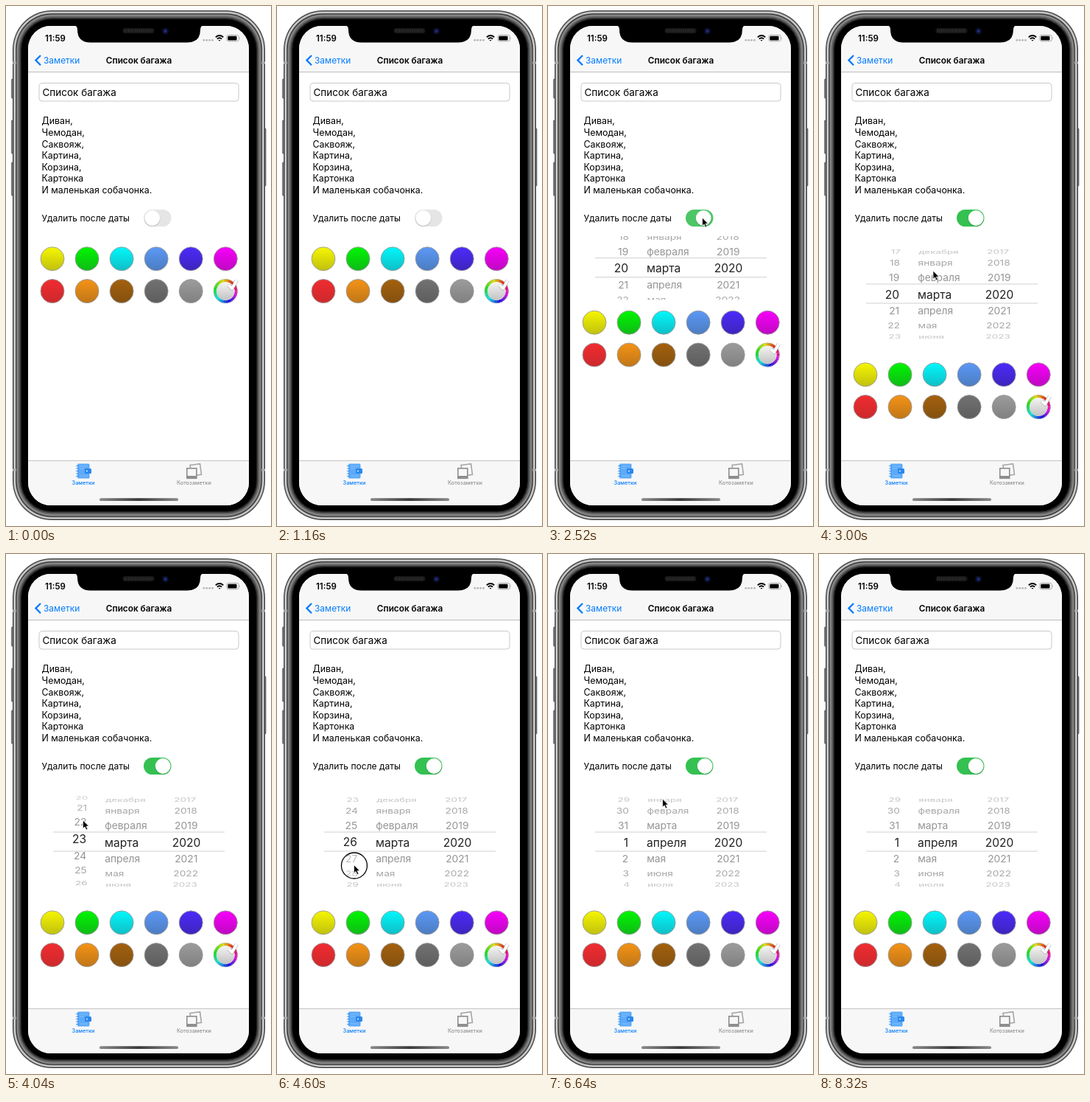
These frames come from a looping animation (360 px wide and 705 px high, 9280 ms). An HTML page:

```html
<!DOCTYPE html>
<html lang="ru">
<head>
<meta charset="utf-8">
<title>Заметки</title>
<style>
html, body { margin: 0; width: 100%; height: 100%; overflow: hidden; background: #fff; }
svg { display: block; width: 360px; height: 705px; font-family: Inter, "Liberation Sans", sans-serif; }
text { white-space: pre; }
</style>
</head>
<body>
<svg id="stage" viewBox="0 0 360 705" xmlns="http://www.w3.org/2000/svg">
  <defs>
    <linearGradient id="disc" x1="0" x2="0" y1="0" y2="1">
      <stop offset="0" stop-color="#f4f4f4"/><stop offset="1" stop-color="#c2c2c2"/>
    </linearGradient>
    <linearGradient id="home">
      <stop offset="0" stop-color="#8a8a8a"/><stop offset=".5" stop-color="#3a3a3a"/>
      <stop offset="1" stop-color="#8a8a8a"/>
    </linearGradient>
    <clipPath id="screen"><rect x="30" y="27" width="300" height="650" rx="31"/></clipPath>
    <clipPath id="wheelClip"><rect id="wheelBox" x="60" width="240"/></clipPath>
  </defs>

  <!-- phone body -->
  <g fill="#8b8b8b" stroke="#444" stroke-width=".7">
    <rect x="7.4" y="99" width="4" height="26" rx="1"/>
    <rect x="7.4" y="155" width="4" height="45" rx="1"/>
    <rect x="7.4" y="212" width="4" height="45" rx="1"/>
    <rect x="349" y="166" width="4" height="78" rx="1"/>
  </g>
  <g id="body"></g>
  <path d="M9 77h5M9 629h5M347 77h5M347 629h5" stroke="#aaa" stroke-width="3"/>

  <g clip-path="url(#screen)">
    <rect x="30" y="27" width="300" height="650" fill="#fff"/>
    <path d="M30 27h300v62.5h-300z" fill="#f7f7f7"/>
    <path d="M30 89.5h300" stroke="#bcbcbc"/>

    <!-- status bar -->
    <text x="53" y="48" font-size="11.5" font-weight="600">11:59</text>
    <g fill="#b5b5b5">
      <circle cx="268.8" cy="46.3" r="1.4"/><circle cx="272.7" cy="46.3" r="1.4"/>
      <circle cx="276.6" cy="46.3" r="1.4"/><circle cx="280.5" cy="46.3" r="1.4"/>
    </g>
    <g fill="none" stroke="#000" stroke-width="1.8">
      <path d="M284.8 42.2q5.2-4.4 10.4 0M286.8 44.6q3.2-2.6 6.4 0"/>
      <path d="M288.5 46l1.5 1.8 1.5-1.8z" fill="#000" stroke="none"/>
    </g>
    <rect x="299.9" y="39.4" width="16.4" height="8.4" rx="2.4" fill="none" stroke="#999" stroke-width=".8"/>
    <rect x="301.3" y="40.8" width="12.2" height="5.6" rx="1.2"/>
    <path d="M317.3 42.2q1.4 1.4 0 2.8z" fill="#999"/>

    <!-- navigation bar -->
    <path d="M47 67l-6.6 6.6 6.6 6.6" fill="none" stroke="#007aff" stroke-width="2.3"/>
    <text x="51" y="78" font-size="11.9" fill="#007aff">Заметки</text>
    <text x="180.5" y="78" font-size="11.8" font-weight="600" text-anchor="middle">Список багажа</text>

    <!-- note -->
    <rect x="45" y="104.5" width="271" height="24.5" rx="4" fill="#fff" stroke="#c9c9c9"/>
    <text x="49.5" y="121.5" font-size="13.5">Список багажа</text>
    <g id="note" font-size="12.4"></g>
    <text x="48.5" y="291.7" font-size="12.1">Удалить после даты</text>
    <rect id="track" x="187" y="276" width="37.5" height="23" rx="11.5"/>
    <circle id="knobShade" cy="288.4" r="10.8" fill="#000" fill-opacity=".12"/>
    <circle id="knob" cy="287.5" r="10.4" fill="#fff"/>

    <!-- date picker -->
    <g id="wheel" clip-path="url(#wheelClip)">
      <path id="lines" d="M64 -13.5H297M64 12.5H297" stroke="#cfcfcf"/>
    </g>

    <g id="palette"></g>

    <!-- tab bar -->
    <path d="M30 616.5h300v61h-300z" fill="#f7f7f7"/>
    <path d="M30 616.5h300" stroke="#c4c4c4"/>
    <rect x="97" y="620.5" width="16.5" height="20" rx="1.5" fill="#5caafa"/>
    <path d="M100 624h11M100 627h6M100 637h11" stroke="#86c0fb"/>
    <path d="M95 623.5h4M95 627h4M95 630.5h4M95 634h4M95 637.5h4" stroke="#3b93f0" stroke-width="1.2"/>
    <rect x="107" y="627" width="9" height="7" rx="1.5" fill="#2b88ec"/>
    <circle cx="110" cy="630.5" r="1.1" fill="#cfe6ff"/>
    <g fill="#f7f7f7" stroke="#8e8e8e">
      <path d="M250 622.5l13.5-1.8 2 14.5-13.5 1.8z" stroke="#a5a5a5" stroke-width="1.6"/>
      <rect x="245.8" y="626.8" width="13" height="13.5" stroke-width="1.6"/>
      <path d="M246 638.6h12.6" stroke-width="3"/>
    </g>
    <g font-size="7.3" font-weight="500" text-anchor="middle">
      <text x="105" y="649" fill="#007aff">Заметки</text>
      <text x="255.5" y="649" fill="#929292">Котозаметки</text>
    </g>
    <rect x="127" y="667.3" width="107" height="3.8" rx="1.9" fill="url(#home)"/>
  </g>

  <!-- notch -->
  <path d="M91 26q6 0 6 6q0 17.5 18 17.5h131q18 0 18-17.5q0-6 6-6z"/>
  <rect x="158.5" y="30" width="43" height="7" rx="3.5" fill="#181818"/>
  <path d="M161 33.5h38" stroke="#333" stroke-width="4" stroke-dasharray="1 1.5"/>
  <circle cx="216.5" cy="34" r="4.6" fill="#0b0e24"/>
  <circle cx="216.5" cy="34" r="2.2" fill="#1d2a78"/>

  <g id="cursor">
    <circle id="press" r="17.5" fill="#fff" fill-opacity=".35" stroke="#000" stroke-width="1.3"/>
    <path d="M-.5 -1v11.2l2.6-2.3 1.9 4.2 2-.9-1.9-4.1h3.5z" stroke="#fff" stroke-width=".8"/>
  </g>
</svg>
<script>
const LOOP = 9280, STEP = 19.3 * Math.PI / 180, RADIUS = 68, OPEN = 157, TOP = 312;
const MONTHS = ['января', 'февраля', 'марта', 'апреля', 'мая', 'июня', 'июля',
  'августа', 'сентября', 'октября', 'ноября', 'декабря'];
const $ = id => document.getElementById(id);
const clamp = v => Math.min(1, Math.max(0, v));
const smooth = v => v * v * (3 - 2 * v);
const linear = v => v;
const out = v => 1 - (1 - v) ** 3;
const wrap = (n, size) => ((n % size) + size) % size;

function add(parent, tag, attrs, content) {
  const el = document.createElementNS('http://www.w3.org/2000/svg', tag);
  for (const key in attrs) el.setAttribute(key, attrs[key]);
  if (content) el.textContent = content;
  return parent.appendChild(el);
}

// Keys are [time, values, ease into this key].
function at(keys, t) {
  const i = keys.findIndex(key => key[0] > t);
  if (i < 0) return keys[keys.length - 1][1];
  if (i === 0) return keys[0][1];
  const [t0, a] = keys[i - 1], [t1, b, ease = smooth] = keys[i];
  const p = ease((t - t0) / (t1 - t0));
  return a.map((v, n) => v + (b[n] - v) * p);
}

// Steel rim: nested rounded shells from the edge inwards
const shells = [[0, '#3a3a3a'], [1, '#8c8c8c'], [2, '#d9d9d9'], [3.6, '#7d7d7d'], [4.6, '#2a2a2a'],
  [5.6, '#8e8e8e'], [7, '#787878'], [8.4, '#5c5c5c'], [9.8, '#3c3c3c'], [11, '#1c1c1c'], [12.2, '#000']];
for (const [inset, fill] of shells)
  add($('body'), 'rect', {
    x: 9 + inset, y: 6 + inset, width: 343 - 2 * inset, height: 691 - 2 * inset, rx: 53 - inset, fill
  });

const pointer = [
  [1400, [322, 430]], [2150, [210, 288]], [2720, [210, 288]],
  [3250, [110, 420]], [3450, [109, 420]], [4040, [105, 362]], [4120, [105, 358]],
  [4450, [105, 425]], [4550, [105, 425]], [5120, [103, 315]], [5350, [103, 315]],
  [5780, [158, 385]], [5900, [158, 385]], [6250, [156, 350]], [6600, [156, 333]],
  [6900, [156, 333]], [7400, [300, 470]]
];
const presses = [[2200, 2360], [3400, 3960], [4550, 5220], [5860, 6220]];
const dayKeys = [
  [3450, [20]], [3960, [22.7]], [4040, [23.2], linear], [4500, [26], out],
  [4580, [26]], [5160, [30.93]], [5450, [31], out], [6250, [31]], [6580, [32]]
];
const monthKeys = [[5900, [2]], [6200, [2.8]], [6450, [3], out]];

const columns = [
  { x: 109, anchor: 'end', keys: dayKeys, label: n => wrap(n - 1, 31) + 1 },
  { x: 134, anchor: 'start', keys: monthKeys, label: n => MONTHS[wrap(n, 12)] },
  { x: 245, anchor: 'middle', keys: [[0, [2020]]], label: n => n }
];
for (const col of columns) {
  col.rows = [];
  for (let k = -4; k <= 4; k++)
    col.rows.push({ k, el: add($('wheel'), 'text', { 'text-anchor': col.anchor }) });
}

['Диван,', 'Чемодан,', 'Саквояж,', 'Картина,', 'Корзина,', 'Картонка', 'И маленькая собачонка.']
  .forEach((line, i) => add($('note'), 'text', { x: 48.5, y: 160.3 + i * 15.6 }, line));

const swatches = [
  ['#f6f600', '#c0c010'], ['#00f600', '#10ba18'], ['#00f8fb', '#10bec6'],
  ['#5b98f6', '#4c7cc0'], ['#4b2bfa', '#3e24bc'], ['#f800fb', '#be08c0'],
  ['#f02c30', '#cc292c'], ['#f49316', '#c07618'], ['#a4600d', '#835110'],
  ['#727272', '#5d5d5d'], ['#9c9c9c', '#808080']
];
const spot = i => ({ cx: 63 + i % 6 * 47.05, cy: i < 6 ? 342.8 : 386.6 });
swatches.forEach(([top, bottom], i) => {
  const grad = add(document.querySelector('defs'), 'linearGradient',
    { id: 'paint' + i, x1: 0, x2: 0, y1: 0, y2: 1 });
  add(grad, 'stop', { offset: 0, 'stop-color': top });
  add(grad, 'stop', { offset: 1, 'stop-color': bottom });
  add($('palette'), 'circle',
    { ...spot(i), r: 16, fill: `url(#paint${i})`, stroke: '#999', 'stroke-width': .9 });
});

// Hue ring with a tick
const ring = spot(11);
for (let a = 0; a < 360; a += 10) {
  const point = deg => {
    const r = deg * Math.PI / 180;
    return `${ring.cx + 14.3 * Math.cos(r)} ${ring.cy - 14.3 * Math.sin(r)}`;
  };
  add($('palette'), 'path', {
    d: `M${point(a)}A14.3 14.3 0 0 0 ${point(a + 10.5)}`,
    fill: 'none', stroke: `hsl(${a - 40} 88% 46%)`, 'stroke-width': 4
  });
}
add($('palette'), 'circle', { ...ring, r: 16.2, fill: 'none', stroke: '#aaa', 'stroke-width': .6 });
add($('palette'), 'circle', { ...ring, r: 12.3, fill: 'url(#disc)' });
for (const [stroke, width] of [['#aaa', 5], ['#fff', 3.8]])
  add($('palette'), 'path', {
    d: 'M302.5 378.5l4.5 4.5 6.5-11', fill: 'none', stroke, 'stroke-width': width, 'stroke-linejoin': 'round'
  });

function drawWheel(t, height) {
  const mid = TOP + height / 2;
  const top = Math.max(TOP, mid - 64), bottom = Math.min(TOP + height, mid + 64);
  $('wheel').style.display = height > 0 ? '' : 'none';
  $('wheelBox').setAttribute('y', top);
  $('wheelBox').setAttribute('height', bottom - top);
  $('lines').setAttribute('transform', `translate(0 ${mid})`);
  for (const col of columns) {
    const [pos] = at(col.keys, t), base = Math.round(pos);
    for (const { k, el } of col.rows) {
      const d = base + k - pos, angle = d * STEP, flat = Math.cos(angle);
      const chosen = Math.abs(d) < .5, size = chosen ? 15.6 : 13.9;
      const zoom = .94 + .06 * flat, shade = 142 + 6 * d * d;
      el.style.display = flat > .05 ? '' : 'none';
      el.textContent = col.label(base + k);
      el.setAttribute('font-size', size);
      el.setAttribute('y', size * .36);
      el.setAttribute('fill', chosen ? '#222' : `rgb(${shade},${shade},${shade})`);
      el.setAttribute('transform', `translate(${180 + (col.x - 180) * zoom} ${mid + .5 + RADIUS * Math.sin(angle)}) scale(${zoom} ${zoom * flat})`);
    }
  }
}

function draw(t) {
  const on = smooth(clamp((t - 2290) / 300));
  const height = OPEN * smooth(clamp((t - 2361) / 300));
  const mix = (a, b) => Math.round(a + (b - a) * on);
  $('track').setAttribute('fill', `rgb(${mix(229, 52)},${mix(229, 193)},${mix(229, 82)})`);
  for (const id of ['knob', 'knobShade']) $(id).setAttribute('cx', 198.7 + 14.5 * on);
  drawWheel(t, height);
  $('palette').setAttribute('transform', `translate(0 ${height})`);
  $('cursor').setAttribute('transform', `translate(${at(pointer, t).join(' ')})`);
  $('cursor').setAttribute('opacity', clamp((t - 1400) / 150) * clamp((7400 - t) / 150));
  $('press').style.display = presses.some(([a, b]) => t >= a && t < b) ? '' : 'none';
}

function tick() {
  draw(performance.now() % LOOP);
  requestAnimationFrame(tick);
}
tick();
</script>
</body>
</html>
```
